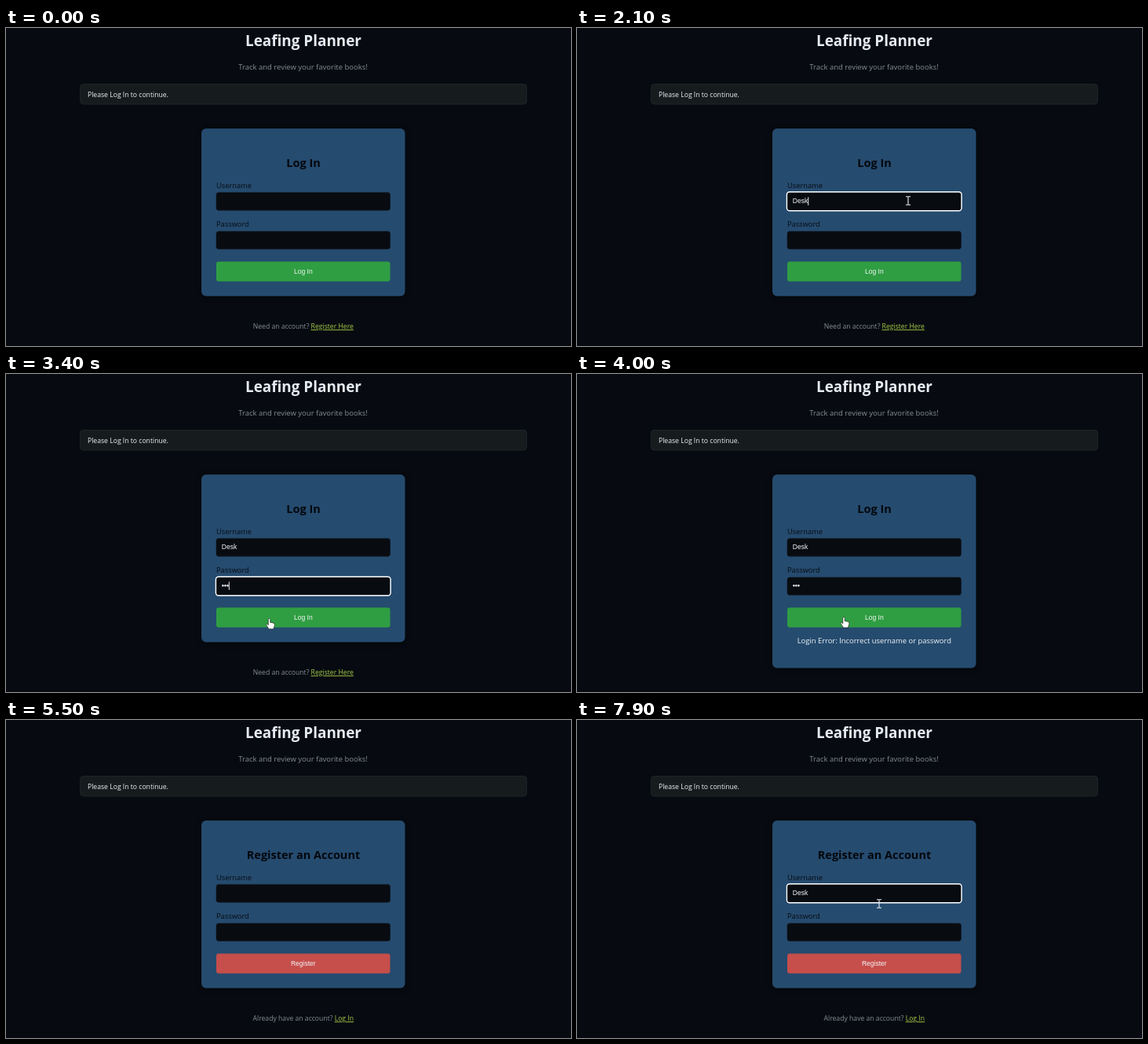
Recreate the animation shown at these times as an HTML page. Size 720 px wide and 405 px high, loop 8 s.

```html
<!DOCTYPE html>
<html lang="en">
<head>
<meta charset="utf-8">
<title>Login form</title>
<style>
  html, body { margin: 0; width: 100%; height: 100%; overflow: hidden; background: #070b11; }
  svg { display: block; width: 720px; height: 405px; font-family: "Open Sans", "Noto Sans", sans-serif; }
  .mid { text-anchor: middle; }
  .bold { font-weight: 700; }
  .label { font-size: 9.3px; fill: #080c12; }
  .small { font-size: 8.65px; }
  .ui { font: 8.55px "Liberation Sans", Arial, sans-serif; fill: #f4f6f8; }
  .field { fill: #080c11; stroke: #10161d; stroke-width: .6; }
  .link { fill: #a9cc46; text-decoration: underline; }
  #card { fill: #254b6f; filter: drop-shadow(0 1.5px 3px #0009); }
  #ring { fill: none; stroke: #fff; stroke-width: 1.4; }
  #caret { fill: #fff; }
</style>
</head>
<body>
<svg viewBox="0 0 720 405">
  <rect width="720" height="405" fill="#070b11"/>
  <text class="mid bold" x="379" y="23" font-size="18.9" fill="#e6eaf2">Leafing Planner</text>
  <text class="mid" x="378.5" y="52.5" font-size="9.5" fill="#858b94">Track and review your favorite books!</text>
  <rect x="94.5" y="71.5" width="569" height="25.5" rx="4" fill="#161b1e" stroke="#24292d" stroke-width=".8"/>
  <text class="small" x="104" y="87.8" fill="#eef1f4">Please Log In to continue.</text>

  <rect id="card" x="249" y="128" width="259.5" height="213.5" rx="6"/>
  <text id="heading" class="mid bold" x="379" y="176.5" font-size="14.5" fill="#04080d"/>
  <text class="label" x="268" y="203.7">Username</text>
  <rect class="field" x="268" y="209.4" width="221.5" height="22.8" rx="3"/>
  <text class="label" x="268" y="253.2">Password</text>
  <rect class="field" x="268" y="259" width="221.5" height="22.5" rx="3"/>
  <rect id="button" x="268" y="297.5" width="221.5" height="25.2" rx="3"/>
  <text id="action" class="ui mid" x="378.8" y="313"/>
  <text id="error" class="mid" x="378.8" y="343" font-size="9.42" fill="#f2f5f8">Login Error: Incorrect username or password</text>
  <text id="footer" class="small mid" x="378.8" y="383" fill="#858b94"><tspan id="ask"></tspan> <tspan id="link" class="link"></tspan></text>

  <text id="user" class="ui" x="274.8" y="223.4"/>
  <g id="dots" fill="#f4f6f8">
    <circle cx="276.4" cy="269.6" r="1.25"/><circle cx="279.4" cy="269.6" r="1.25"/><circle cx="282.4" cy="269.6" r="1.25"/>
  </g>
  <rect id="ring" x="267.4" width="222.7" height="24" rx="3.5"/>
  <rect id="caret" width=".9" height="10.5"/>

  <g id="arrow" class="cursor">
    <path d="M0 0V11.5L2.7 9 4.5 13 6.3 12.2 4.6 8.3H8.2Z" fill="#fff" stroke="#000" stroke-width=".7"/>
  </g>
  <g id="beam" class="cursor" fill="none">
    <path d="M-3-5.3H-.7L0-4.8.7-5.3H3M0-4.8V4.8M-3 5.3H-.7L0 4.8.7 5.3H3" stroke="#eef1f4" stroke-width="1.1"/>
  </g>
  <g id="hand" class="cursor">
    <path d="M-1.2 1C-1.2-.4 1.2-.4 1.2 1V5L3.3 5.2 5.2 5.7 6.6 6.4Q7 7.2 6.7 9L5.4 13.3H-.5L-2.6 10-4 7.7Q-4 6.3-2.6 7L-1.2 8.3Z" fill="#fff" stroke="#111" stroke-width=".6"/>
  </g>
</svg>
<script>
const LOOP = 8000, STEP = 100;
const NAME = "Desk";
const $ = id => document.getElementById(id);
const set = (id, attrs) => { for (const k in attrs) $(id).setAttribute(k, attrs[k]); };
const show = (id, on) => { $(id).style.display = on ? "" : "none"; };
const passed = (times, t) => times.filter(s => t >= s).length;

const keys = {
  login: [1400, 1600, 1800, 2000],
  password: [2900, 3050, 3200],
  register: [6700, 7000, 7200, 7300]
};

// Each path is a list of [time, x, y]; the pointer is hidden between paths.
const paths = [
  [[100, 350, 13], [400, 386, 120], [700, 418, 214], [900, 423, 221], [2100, 422, 220],
   [2500, 402, 264], [2700, 396, 270], [2900, 390, 271], [3200, 344, 304], [3400, 335.5, 311.5],
   [3700, 338, 311], [4000, 340, 309.7], [4200, 342, 309], [4300, 342, 309], [4700, 412, 404], [4800, 416, 420]],
  [[5600, 414, 402], [5900, 382, 300], [6200, 352, 220], [6400, 349, 215], [6499, 349, 215]],
  [[7900, 385, 234], [8000, 385, 234]]
];

function pointerAt(t) {
  const path = paths.find(p => t >= p[0][0] && t <= p.at(-1)[0]);
  if (!path) return null;
  const i = Math.max(1, path.findIndex(p => p[0] >= t));
  const [t0, x0, y0] = path[i - 1], [t1, x1, y1] = path[i];
  const k = (t - t0) / (t1 - t0);
  return [x0 + (x1 - x0) * k, y0 + (y1 - y0) * k];
}

function pointerKind(x, y) {
  const inside = (top, bottom) => x > 268 && x < 490 && y > top && y < bottom;
  if (inside(297, 323)) return "hand";
  return inside(209, 235) || inside(259, 282) ? "beam" : "arrow";
}

function draw(t) {
  const registering = t >= 5500;
  const failed = t >= 3800 && !registering;
  const typed = passed(registering ? keys.register : keys.login, t);
  const dots = registering ? 0 : passed(keys.password, t);

  $("heading").textContent = registering ? "Register an Account" : "Log In";
  $("action").textContent = registering ? "Register" : "Log In";
  $("ask").textContent = registering ? "Already have an account?" : "Need an account?";
  $("link").textContent = registering ? "Log In" : "Register Here";
  set("button", { fill: registering ? "#c64e4b" : "#2f9e42" });
  set("card", { height: failed ? 246.5 : 213.5 });
  set("footer", { y: failed ? 416 : 383 });
  show("error", failed);

  $("user").textContent = NAME.slice(0, typed);
  [...$("dots").children].forEach((dot, i) => { dot.style.display = i < dots ? "" : "none"; });

  const onPassword = t >= 2700 && t < 3700;
  const onUser = t >= 1000 && t < 2700 || t >= 6300;
  show("ring", onUser || onPassword);
  set("ring", { y: onPassword ? 258.3 : 208.8 });

  // The caret blinks every 500 ms, counted from the last focus or key press.
  const marks = [1000, 2700, 6300, ...Object.values(keys).flat()].filter(s => s <= t);
  const lit = (t - Math.max(...marks)) % 1000 < 500;
  show("caret", (onUser || onPassword) && lit);
  const end = onPassword ? 274.8 + dots * 3 : 274.8 + (typed && $("user").getComputedTextLength());
  set("caret", { x: end, y: onPassword ? 264.5 : 215.4 });

  const at = pointerAt(t);
  const kind = at && pointerKind(...at);
  for (const id of ["arrow", "beam", "hand"]) show(id, id === kind);
  if (at) set(kind, { transform: `translate(${at})` });
}

const start = performance.now();
function tick() {
  const t = (performance.now() - start) % LOOP;
  draw(Math.floor(t / STEP) * STEP);
  requestAnimationFrame(tick);
}
tick();
</script>
</body>
</html>
```
